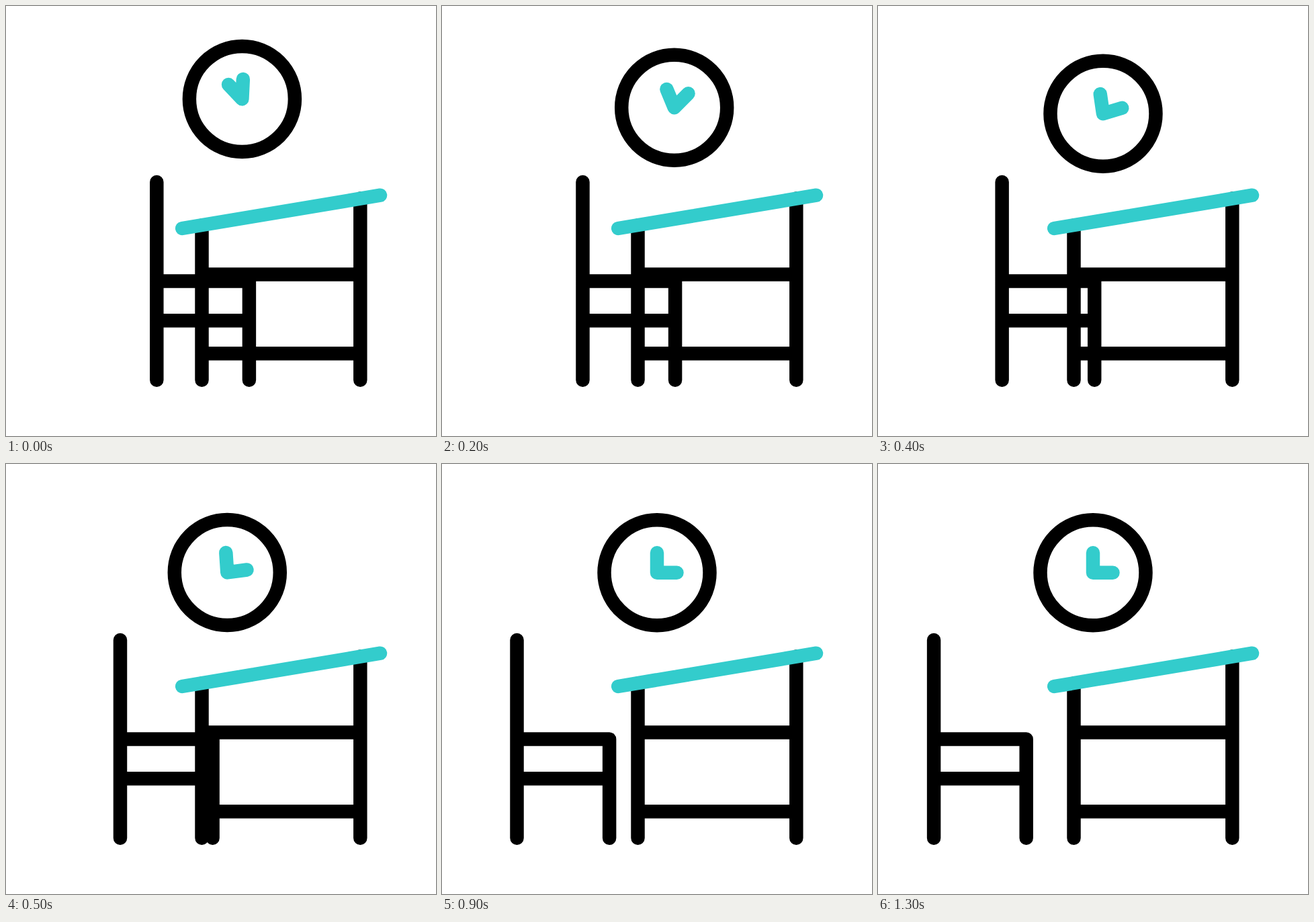
These frames come from a looping animation (640 by 640 pixels, 1.4 s). An HTML page:

```html
<!DOCTYPE html>
<html lang="en">
<head>
<meta charset="utf-8">
<title>Desk, chair and clock</title>
<style>
  html, body { margin: 0; width: 100%; height: 100%; overflow: hidden; background: #fff; }
  svg { display: block; width: 100%; height: 100%; }
  g { fill: none; stroke: #000; stroke-width: 20.48; stroke-linecap: round; stroke-linejoin: round; }
  .accent { stroke: #3cc; }
</style>
</head>
<body>
<svg viewBox="0 0 640 640">
  <g>
    <path id="chair" d="M0 262V556.8M0 409.4H137.6V556.8M0 468.3H137.6"/>
    <path d="M291.5 326.5V556.8M527.3 286.6V556.8M291.5 399.4H527.3M291.5 517.3H527.3"/>
    <path class="accent" d="M262.2 331L557 281.7"/>
    <g id="clock">
      <circle r="78.5"/>
      <path id="hands" class="accent"/>
    </g>
  </g>
</svg>
<script>
const STEP = 100, STEPS = 14, HAND = 29.5;
const el = id => document.getElementById(id);
const chair = el("chair"), clock = el("clock"), hands = el("hands");
const smooth = u => u * u * (3 - 2 * u);

// Point on the dial, in degrees clockwise from twelve
const tip = deg => {
  const a = deg * Math.PI / 180;
  return `${HAND * Math.sin(a)} ${-HAND * Math.cos(a)}`;
};

function draw(step) {
  chair.setAttribute("transform", `translate(${226.4 - 143.3 * smooth((step + 1) / STEPS)} 0)`);

  // The clock drops along a curve while its hands swing to three o'clock
  const left = step < 7 ? (7.1 - step) / 7.215 : 0;
  const dx = left * (20.9 + 49.07 * left - 38.5 * left * left);
  const q = dx * dx;
  const dy = q * (0.003055 + 1.715e-5 * q + 3.9e-9 * q * q);
  clock.setAttribute("transform", `translate(${320 + dx} ${161.8 - dy})`);

  const turn = 45 * left * left;
  hands.setAttribute("d", `M${tip(-turn)}L0 0L${tip(90 - 2 * turn)}`);
}

const start = performance.now();
function tick() {
  draw(Math.floor((performance.now() - start) / STEP) % STEPS);
  requestAnimationFrame(tick);
}
tick();
</script>
</body>
</html>
```
